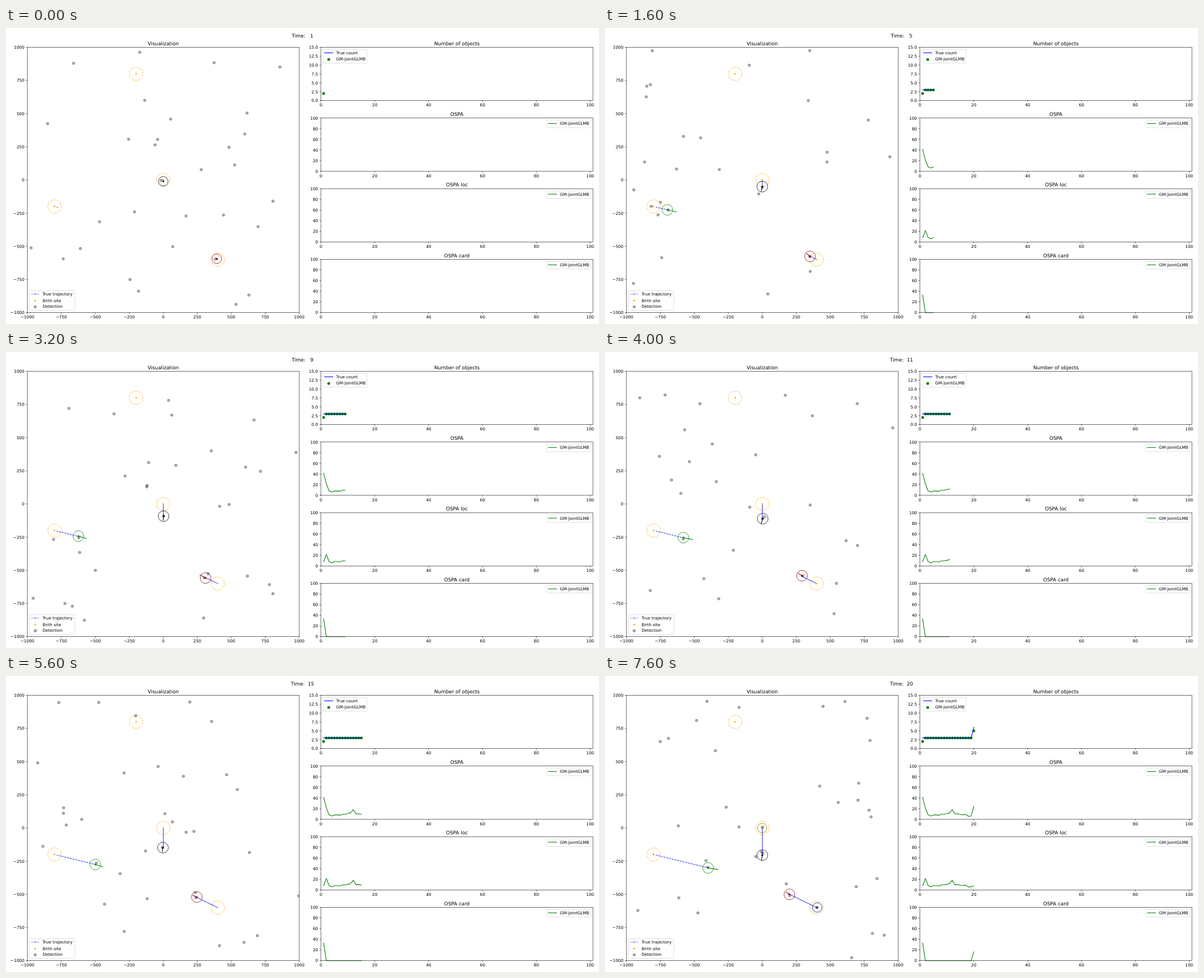
An HTML page for the animation above (8000 ms loop, 1058 px wide and 529 px high).

```html
<!DOCTYPE html>
<html lang="en">
<head>
<meta charset="utf-8">
<title>Multi-object tracking</title>
<style>
  html, body { margin: 0; width: 100%; height: 100%; overflow: hidden; background: #fff; }
  svg { display: block; width: 100vw; height: 100vh; }
  text {
    font: 7.35px "DejaVu Sans", Verdana, sans-serif;
    white-space: pre;
    text-rendering: geometricPrecision;
  }
  .title { font-size: 8.82px; text-anchor: middle; }
  .frame { fill: none; stroke: #000; stroke-width: .6; }
  .tick { stroke: #000; stroke-width: .6; }
  .legend { fill: #fff; fill-opacity: .8; stroke: #ccc; stroke-opacity: .8; stroke-width: .73; }
  .curve { fill: none; stroke-width: 1.1; stroke-linejoin: round; stroke-linecap: square; }
  .hit { fill: #000; fill-opacity: .3; stroke: #000; stroke-opacity: .3; stroke-width: 1.1; }
  .site { fill: none; stroke: orange; stroke-width: .75; stroke-dasharray: 2.72 1.18; }
  .path { fill: none; stroke: #00f; stroke-opacity: .55; stroke-width: .73; }
</style>
</head>
<body>
<svg viewBox="0 0 1058 529" preserveAspectRatio="none">
  <clipPath id="area"><rect x="38.1" y="34.5" width="485" height="474.2"/></clipPath>
  <g id="back"></g>
  <g id="live"></g>
  <g id="front"></g>
  <text id="clock" class="title" x="529" y="17.2"></text>
</svg>
<script>
const STEP = 400, STEPS = 20;
const $ = s => document.querySelector(s);
const range = (n, f) => Array.from({ length: n }, (_, i) => f(i));

// Plot areas
const plot = (name, x, y, w, h, xlim, ylim) => ({
  name, x, y, w, h,
  px: v => x + (v - xlim[0]) / (xlim[1] - xlim[0]) * w,
  py: v => y + h - (v - ylim[0]) / (ylim[1] - ylim[0]) * h
});
const map = plot('Visualization', 38.1, 34.5, 485, 474.2, [-1000, 1000], [-1000, 1000]);
const side = (name, row, top) => plot(name, 561.9, 34.5 + row * 126.33, 485.2, 95.2, [0, 101], [0, top]);
const count = side('Number of objects', 0, 15);
const ospa = side('OSPA', 1, 100);
const loc = side('OSPA loc', 2, 100);
const card = side('OSPA card', 3, 100);
const scores = [ospa, loc, card];

// Drawing helpers
const text = (s, x, y, anchor = 'start') => `<text x="${x}" y="${y}" text-anchor="${anchor}">${s}</text>`;
const title = (s, x, y) => `<text class="title" x="${x}" y="${y}">${s}</text>`;
const dot = (x, y, r, fill) => `<circle cx="${x}" cy="${y}" r="${r}" fill="${fill}"/>`;
const hit = (x, y) => `<circle class="hit" cx="${x}" cy="${y}" r="2.2"/>`;
const line = (x1, y1, x2, y2, cls, color = '') =>
  `<line class="${cls}" x1="${x1}" y1="${y1}" x2="${x2}" y2="${y2}"${color && ` stroke="${color}"`}/>`;
const poly = (pts, cls, color = '') =>
  `<polyline class="${cls}" points="${pts.map(p => p.join()).join(' ')}"${color && ` stroke="${color}"`}/>`;
const legend = (x, y, w, h) => `<rect class="legend" x="${x}" y="${y}" width="${w}" height="${h}" rx="1.5"/>`;
const label = (v, digits) => v.toFixed(digits).replace('-', '\u2212');

function axes(p, xs, ys, digits) {
  const base = p.y + p.h;
  return title(p.name, p.x + p.w / 2, p.y - 3.9) +
    xs.map(v => line(p.px(v), base, p.px(v), base + 2.6, 'tick') +
      text(label(v, 0), p.px(v), base + 10.75, 'middle')).join('') +
    ys.map(v => line(p.x - 2.6, p.py(v), p.x, p.py(v), 'tick') +
      text(label(v, digits), p.x - 5.14, p.py(v) + 2.7, 'end')).join('');
}

// Dashes run from the bottom of the ring, counter-clockwise
function birthSite([x, y]) {
  const cx = map.px(x), cy = map.py(y), rx = 12.1, ry = 11.85;
  const half = dir => `A${rx} ${ry} 0 0 0 ${cx} ${cy + dir * ry}`;
  return `<path class="site" d="M${cx} ${cy + ry}${half(-1)}${half(1)}"/>` + dot(cx, cy, 1.4, 'orange');
}

function drawStatic() {
  const grid = range(9, i => i * 250 - 1000);
  const time = range(6, i => i * 20);
  const sites = [[0, 0], [-800, -200], [400, -600], [-200, 800]];
  $('#back').innerHTML =
    axes(map, grid, grid, 0) +
    axes(count, time, range(7, i => i * 2.5), 1) +
    scores.map(p => axes(p, time, time, 0)).join('') +
    sites.map(birthSite).join('');

  $('#front').innerHTML =
    [map, count, ...scores].map(p =>
      `<rect class="frame" x="${p.x}" y="${p.y}" width="${p.w}" height="${p.h}"/>`).join('') +
    legend(41.8, 469.4, 81, 35.4) +
    line(44.7, 475.6, 59.4, 475.6, 'path') + dot(52.1, 475.6, .8, '#00f') +
    dot(52.1, 487.2, 1.4, 'orange') + hit(52.1, 498.2) +
    text('True trajectory', 65.2, 478.3) +
    text('Birth site', 65.2, 489.6) +
    text('Detection', 65.2, 500.4) +
    legend(565.5, 38.2, 78.7, 24.6) +
    line(568.4, 44.4, 583.1, 44.4, 'curve', '#00f') +
    dot(575.8, 56.2, 2.5, 'green') +
    text('True count', 589, 47.1) +
    text('GM-JointGLMB', 589, 58.4) +
    scores.map(p =>
      legend(964.7, p.y + 3.7, 78.7, 13.6) +
      line(967.7, p.y + 9.8, 982.4, p.y + 9.8, 'curve', 'green') +
      text('GM-JointGLMB', 988.2, p.y + 12.5)).join('');
}

function random(seed) {
  let s = seed;
  return () => {
    s = s + 0x6D2B79F5 | 0;
    let t = Math.imul(s ^ s >>> 15, 1 | s);
    t = t + Math.imul(t ^ t >>> 7, 61 | t) ^ t;
    return ((t ^ t >>> 14) >>> 0) / 4294967296;
  };
}

// Objects: start, velocity per step, first step alive, first step tracked
const track = (x, y, vx, vy, color, born, found = born) => ({ x, y, vx, vy, color, born, found });
const tracks = [
  track(0, 0, 0, -10, '#000', 1),
  track(-800, -200, 20, -5, 'green', 1, 2),
  track(400, -600, -10, 5, 'maroon', 1),
  track(0, 0, 0, 0, 'olive', STEPS),
  track(400, -600, 0, 0, 'navy', STEPS),
  track(-800, -200, 0, 0, 'teal', STEPS, STEPS + 1)
];
const alive = k => tracks.filter(t => t.born <= k);
const found = k => tracks.filter(t => t.found <= k);
function truth(t, k) {
  const age = k - t.born + 1;
  return [map.px(t.x + t.vx * age), map.py(t.y + t.vy * age)];
}

// Estimate ring with a heading of a few steps' travel
function estimate(t, k, noise) {
  const [x, y] = truth(t, k).map(v => v + noise(1.2));
  const fresh = k === t.born;
  const dx = t.vx * .8 + noise(4), dy = -t.vy * .8 + noise(2);
  return `<circle cx="${x}" cy="${y}" r="${fresh ? 8.5 : 9.6}" fill="none" stroke="${t.color}" stroke-width=".75"/>` +
    dot(x, y, 1.6, t.color) +
    (fresh ? '' : line(x, y, x + dx, y + dy, 'curve', t.color));
}

function trajectory(t, k) {
  const pts = range(k - t.born + 1, i => truth(t, t.born + i));
  return poly(pts, 'path') + pts.map(p => dot(...p, .75, '#00f')).join('');
}

function drawMap(k) {
  const rnd = random(k * 7919);
  const noise = size => (rnd() + rnd() - 1) * size;
  const clutter = range(24 + Math.floor(rnd() * 8), () => [map.x + rnd() * map.w, map.y + rnd() * map.h]);
  const seen = found(k).map(t => truth(t, k).map(v => v + noise(4)));
  return '<g clip-path="url(#area)">' +
    [...clutter, ...seen].map(p => hit(...p)).join('') +
    alive(k).map(t => trajectory(t, k)).join('') +
    found(k).map(t => estimate(t, k, noise)).join('') + '</g>';
}

// Scores: the location error is given, the rest follows from the counts
const locError = [8, 21.5, 8.5, 6, 8, 8, 7.5, 9.5, 9.5, 10.5, 12, 18, 10, 10.2, 9, 8.3, 9.2, 5.5, 6, 7.5];
const locAt = k => locError[k - 1];
const cardAt = k => 100 * (1 - found(k).length / alive(k).length);
const ospaAt = k => locAt(k) + cardAt(k);

const series = (p, f, k) => range(k, i => [p.px(i + 1), p.py(f(i + 1))]);
const curve = (p, f, k, color) => k > 1 ? poly(series(p, f, k), 'curve', color) : '';

function draw(k) {
  $('#live').innerHTML =
    drawMap(k) +
    series(count, s => found(s).length, k).map(p => dot(...p, 2.5, 'green')).join('') +
    curve(count, s => alive(s).length, k, '#00f') +
    curve(ospa, ospaAt, k, 'green') +
    curve(loc, locAt, k, 'green') +
    curve(card, cardAt, k, 'green');
  $('#clock').textContent = 'Time: ' + String(k).padStart(3);
}

drawStatic();
const start = performance.now();
let shown = 0;
function tick() {
  const k = Math.floor((performance.now() - start) / STEP) % STEPS + 1;
  if (k !== shown) draw(shown = k);
  requestAnimationFrame(tick);
}
tick();
</script>
</body>
</html>
```
